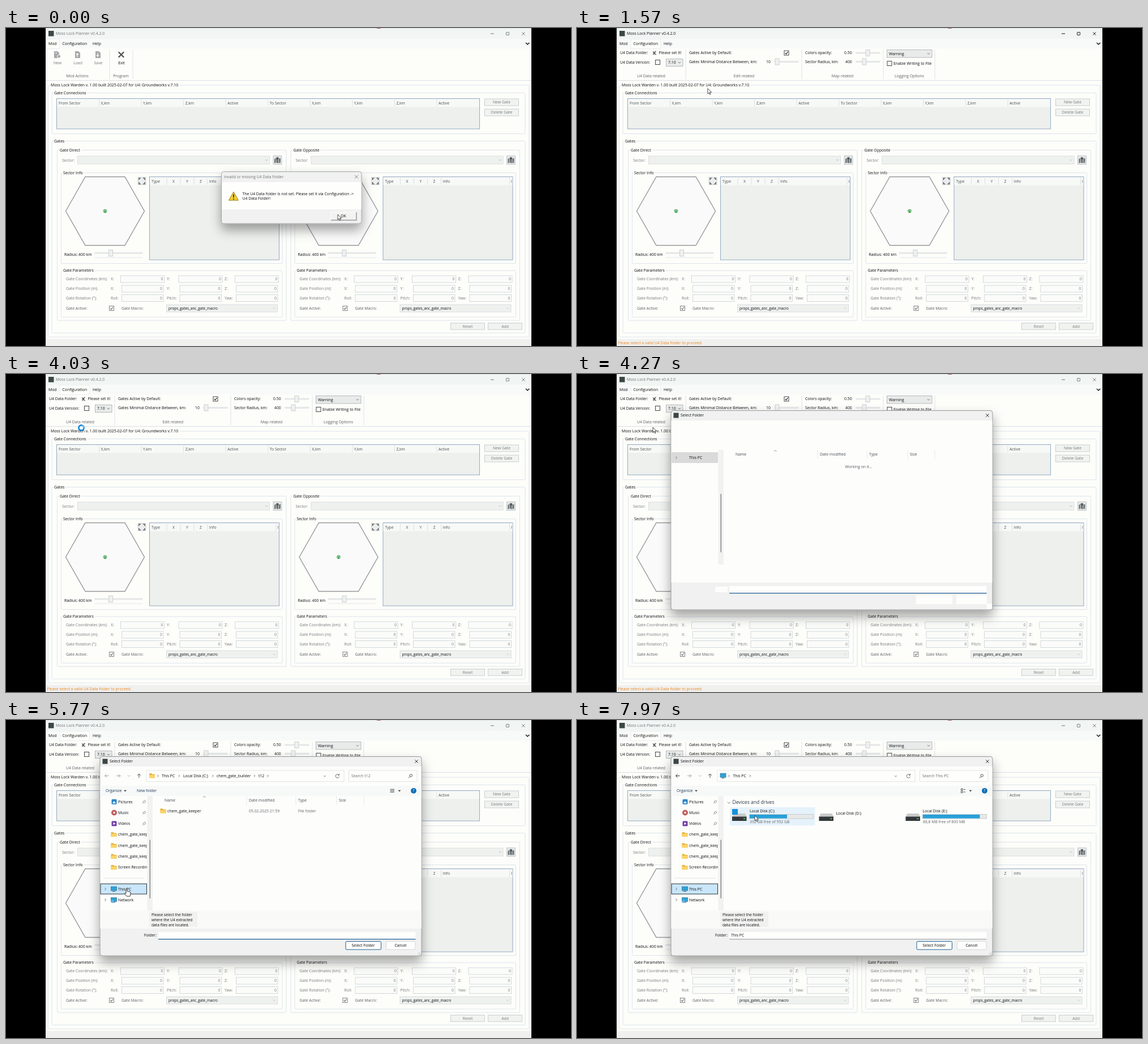
Write an HTML page that moves like this. It is 998 by 561 pixels and loops after 8 s.

```html
<!DOCTYPE html>
<html lang="en">
<head>
<meta charset="utf-8">
<title>Moss Lock Planner</title>
<style>
html, body { margin: 0; width: 100%; height: 100%; overflow: hidden; background: #000; }
svg { display: block; width: 100%; height: 100%; }
text { font-family: "Open Sans", "Noto Sans", sans-serif; white-space: pre; }
</style>
</head>
<body>
<svg id="stage" viewBox="0 0 998 561"></svg>
<script>
const INK = '#0c0e10', GREY = '#787b7b', LINE = '#dbe2ea', BG = '#fdfdfa', BLUE = '#1f5c93';
const LOOP = 8000;

// Drawing helpers
const rect = (x, y, w, h, fill, stroke = 'none', more = '') =>
  `<rect x="${x}" y="${y}" width="${w}" height="${h}" fill="${fill}" stroke="${stroke}" ${more}/>`;
const text = (x, y, s, fill = INK, size = 6.87, anchor = 'start', more = '') =>
  `<text x="${x}" y="${y + 2.4}" font-size="${size}" fill="${fill}" text-anchor="${anchor}" ${more}>${s}</text>`;
const mid = (x, y, s, fill) => text(x, y, s, fill, 6.87, 'middle');
const path = (d, stroke, w = 1, fill = 'none', more = '') =>
  `<path d="${d}" stroke="${stroke}" stroke-width="${w}" fill="${fill}" ${more}/>`;
const group = (id, body, more = '') => `<g id="${id}" ${more}>${body}</g>`;
const at = (x, y, body) => `<g transform="translate(${x} ${y})">${body}</g>`;
const each = (list, fn) => list.map(fn).join('');

const frame = (x, y, w, h, label, lx) =>
  rect(x, y, w, h, 'none', LINE, 'rx="1.5" stroke-width=".9"') +
  text(lx, y, label, INK, 6.87, 'start', `stroke="${BG}" stroke-width="4" paint-order="stroke"`);
const button = (x, y, w, h, s) =>
  rect(x, y, w, h, '#f1f3f1', '#c6cbcd', 'stroke-width=".9"') + mid(x + w / 2, y + h / 2, s, GREY);
const down = (x, y, c = '#555', r = 2) => path(`M${x - r} ${y - r / 2}l${r} ${r}l${r} ${-r}`, c, .8);
const cross = (x, y, r, c, w = .9) => path(`M${x - r} ${y - r}l${2 * r} ${2 * r}m0 ${-2 * r}l${-2 * r} ${2 * r}`, c, w);
const combo = (x, y, w, h, s, c, fill, edge = '#b0b4b6', size) =>
  rect(x, y, w, h, fill, edge, 'stroke-width=".9"') + text(x + 3.5, y + h / 2, s, INK, size) + down(x + w - 6, y + h / 2, c);
const check = (x, y, on, c = '#333') =>
  rect(x, y, 8, 8, '#fff', c, 'stroke-width=".9"') + (on ? path(`M${x + 1.8} ${y + 4}l1.7 2l3 -4.2`, c, 1.2) : '');
const slider = (x, y, w, thumb) =>
  rect(x, y - 1, w, 2, '#eceeee', '#d3d8db', 'stroke-width=".6"') +
  rect(thumb, y - 5.5, 7, 11, '#eff0f0', '#c4c8ca', 'stroke-width=".8"');
const list = (x, y, w, h, cols, seps) =>
  rect(x, y, w, h, '#edf0ed', '#94a9c2') + rect(x + .6, y + .6, w - 1.2, 14, '#f7f9f7') +
  each(cols, c => text(c[0], y + 8.5, c[1], '#4a4f51')) +
  each(seps, s => path(`M${s} ${y + 2}v12`, '#d4dade', .8));

const titleBar = c =>
  text(88, 10, 'Moss Lock Planner v0.4.2.0', c) +
  path('M856 10h6', c) + rect(883.5, 7.5, 5, 5, 'none', c, 'stroke-width=".9" rx=".6"') + cross(914, 10, 2.7, c);

function fileIcon(x, y, mark) {
  return path(`M${x - 4} ${y - 6}h6l3 3v9h-9z`, 'none', 0, '#a5a8a8') + path(mark, '#fff', 1.3);
}

const modRibbon = () =>
  path('M183 38v52M224 38v52', LINE, .9) +
  fileIcon(89, 47, 'M87 44h3') + `<circle cx="93.5" cy="50" r="3" fill="#a5a8a8" stroke="${BG}"/>` +
  fileIcon(126, 47, 'M126 51v-6m-2 2l2 -2l2 2') + fileIcon(162, 47, 'M162 44v6m-2 -2l2 2l2 -2') +
  cross(203.5, 47, 4.7, '#505252', 2.3) +
  each([['New', 91], ['Load', 127], ['Save', 163]], a => mid(a[1], 62, a[0], GREY)) + mid(204, 62, 'Exit') +
  mid(126, 85, 'Mod Actions', '#5e6162') + mid(203, 85, 'Program', '#5e6162');

const configRibbon = () =>
  path('M192 38v52M397 38v52M541 38v52M632 38v52', LINE, .9) +
  text(76, 44, 'U4 Data Folder:') + path('M134 41l2 2v3l-2 1M140 41l-3 1v4l3 1M134 44h5', '#3a3a3a', 1) + text(144.5, 44, 'Please set it!') +
  text(76, 61, 'U4 Data Version:') + check(138.5, 56.5, false) + combo(157.5, 54.5, 29.5, 13, '7.10', '#555', '#e9ebea') +
  text(198, 44, 'Gates Active by Default:') + check(366, 40, true) +
  text(198, 59.5, 'Gates Minimal Distance Between, km:') + text(334, 59.5, '10') + slider(349, 59.5, 42, 350) +
  text(403, 44, 'Colors opacity:') + text(472, 44, '0.50') + slider(493, 44, 42, 510) +
  text(403, 59.5, 'Sector Radius, km:') + text(474, 59.5, '400') + slider(493, 59.5, 42, 504) +
  combo(547.5, 38.5, 79.5, 13.5, 'Warning', '#555', '#e9ebea') + check(548, 58.5, false) + text(559, 62.5, 'Enable Writing to File') +
  each([[131, 'U4 Data related'], [295, 'Edit related'], [469, 'Map related'], [587, 'Logging Options']], c => mid(c[0], 85, c[1], '#5e6162'));

function gatePanel(dx, name) {
  const field = (x, y, w) => rect(x, y - 6, w, 12, '#fbfcfa', '#cfd4d9', 'stroke-width=".9"') + text(x + w - 2, y, '0', GREY, 6.87, 'end');
  const row = (y, label, names, wide) => text(106, y, label, GREY) +
    each([185, 284, 386], (x, i) => text(x, y, names[i], GREY)) +
    each([202.5, 305, 404.5], x => wide ? field(x, y, 77) : field(x + 2, y, 73.5));
  return at(dx, 0,
    frame(90.5, 215.5, 404.5, 300.5, name, 95) +
    text(99, 233.5, 'Sector:', GREY) + rect(126.5, 226, 339, 14, '#eff1ef', '#dadfe2') + down(460, 233, '#aaa') +
    rect(472, 225.5, 15, 15, '#e4e7e7', '#c3c8cb') +
    path('M474 231l3 -1.5l4 1.5l4 -1.5v8l-4 1l-4 -1l-3 1z', 'none', 0, '#70777a') + path('M477 230v8M481.5 231v8', '#e4e7e7', .8) +
    '<circle cx="479.5" cy="230" r="2.3" fill="#555b5e"/>' +
    frame(97.5, 255.5, 390.5, 160, 'Sector Info', 101) +
    path('M105.5 323L140 262.5H210L244.5 323L210 383.5H140Z', '#96989c', 1.4, '#fafafa') +
    '<circle cx="175" cy="323" r="3.3" fill="#45a455"/>' + path('M173 325v-2.5q2 -2.5 4 0v2.5', '#d8f0da', .9) +
    rect(233, 263.5, 14, 13, '#ebedee', '#c3c8cb', 'stroke-width=".8"') +
    path('M235 268v-3h3M242 265h3v3M245 272v3h-3M238 275h-3v-3', '#303234', 1.2) +
    list(253.5, 262.5, 229, 146.5, [[257, 'Type'], [294, 'X'], [318, 'Y'], [342, 'Z'], [359, 'Info'], [479.5, 'I']], [284, 308, 332, 356, 477]) +
    text(103, 400, 'Radius: 400 km') + slider(157, 397, 84, 181.5) + path('M157 405h84', '#dcdfe2', .8) +
    frame(97.5, 428, 390.5, 82, 'Gate Parameters', 101) +
    row(443, 'Gate Coordinates (km):', ['X:', 'Y:', 'Z:'], true) +
    row(460, 'Gate Position (m):', ['X:', 'Y:', 'Z:']) +
    row(476.5, 'Gate Rotation (°):', ['Roll:', 'Pitch:', 'Yaw:']) +
    text(106, 494.5, 'Gate Active:', '#5c5f60') + check(182.5, 490.5, true, '#777') + text(204, 494.5, 'Gate Macro:', '#5c5f60') +
    combo(283.5, 488, 196, 13, 'props_gates_anc_gate_macro', '#bbb', '#eff1ef', '#d5dadd', 6.4));
}

const mainWindow = () =>
  rect(70, 0, 858, 561, BG) + rect(70, 0, 858, 19, '#f1f5f4') +
  rect(70, 0, 858, .6, '#cfd4d6') + rect(655, 0, 7, 1, '#a55') + rect(75, 5, 9.5, 9.5, '#3c4745') +
  group('titleOn', titleBar('#101214')) + group('titleOff', titleBar('#707476')) +
  rect(70, 19, 858, 17, '#f8f9f9') +
  group('tabMod', rect(70.5, 20, 24, 16.5, BG, '#e3e7eb', 'stroke-width=".7"')) +
  group('tabConfig', rect(95, 20, 52.5, 16.5, BG, '#e3e7eb', 'stroke-width=".7"')) +
  text(75, 27.5, 'Mod') + text(99.5, 27.5, 'Configuration') + text(153, 27.5, 'Help') +
  path('M918 26l3.2 3l3.2 -3', '#111', 1.4) +
  path('M70 92.5H928', '#dce1e8') + group('modRibbon', modRibbon()) + group('configRibbon', configRibbon()) +
  frame(74.5, 101, 849.5, 444, 'Moss Lock Warden v. 1.00 built 2025-02-07 for U4: Groundworks v.7.10', 79) +
  frame(81, 114.5, 836, 72, 'Gate Connections', 85) +
  list(89.5, 124.5, 747, 53.5,
    ['From Sector', 'X,km', 'Y,km', 'Z,km', 'Active', 'To Sector', 'X,km', 'Y,km', 'Z,km', 'Active'].map((s, i) => [93 + 74.55 * i, s]),
    Array.from({ length: 9 }, (_, i) => 164.5 + 74.55 * i)) +
  button(845.5, 125, 60, 12, 'New Gate') + button(845.5, 143, 60, 12, 'Delete Gate') +
  frame(81, 199.5, 836, 338.5, 'Gates', 85) +
  gatePanel(0, 'Gate Direct') + gatePanel(412.5, 'Gate Opposite') +
  button(785.5, 520.5, 60, 11.5, 'Reset') + button(851.5, 520.5, 60, 11.5, 'Add') +
  rect(70, 548.5, 858, 12.5, '#f0f0ef') +
  group('status', text(72, 555.5, 'Please select a valid U4 Data folder to proceed.', '#e9851f'));

const warning = () =>
  rect(380.5, 253.5, 247.5, 91.5, '#f0f1f0', '#a0a4a7', 'rx="4" filter="url(#shade)"') +
  rect(381, 272, 246.5, 48, '#fefefd') +
  text(385, 263, 'Invalid or missing U4 Data Folder', '#707476') + cross(619, 262.5, 2.8, '#777') +
  path('M402 289l8.5 15h-17z', '#8f7f22', 1, '#f3cf2e', 'stroke-linejoin="round"') + path('M402 293.5v5.5M402 300.8v1.7', '#222', 1.7) +
  text(417.5, 292.5, 'The U4 Data folder is not set. Please set it via Configuration -&gt;') + text(417.5, 300.5, 'U4 Data Folder!') +
  rect(574, 325, 45, 14, '#f2f2f1') + path('M574 339V325H619', '#fff') + path('M574 339H619V325', '#6a6d6e') + mid(596, 332, 'OK');

// File picker
const crumbs = items => each(items, a => text(a[0], 98.5, a[1]) + path(`M${a[2]} 96.8l1.7 1.8l-1.7 1.8`, '#555', .9));
const folder = (x, y) => path(`M${x - 5} ${y - 4}h4l1.5 1.5h4.5v6.5h-10z`, 'none', 0, '#e6b13c') + rect(x - 5, y - 1.3, 10, 5.3, '#fbd468');
const screen = (x, y) => rect(x - 5, y - 4.2, 10, 7, '#2ea2d6', '#33718f', 'stroke-width=".7"') + path(`M${x - 2.5} ${y + 4.2}h5`, '#557', 1);
const drive = x => path(`M${x + 3} 165h20l3 6h-26z`, 'none', 0, '#c8caca') + rect(x, 170.5, 25.5, 7.5, '#34383a') + rect(x + 20, 173.5, 3, 1.3, '#6fe08a');
const usage = (x, used, s) => rect(x, 166.5, 113, 7.5, '#e7e8e8', '#bec2c4', 'stroke-width=".8"') +
  rect(x + .5, 167, used, 6.5, '#27a0d9') + text(x + .5, 179.5, s, '#636668');
const rowY = i => 144.2 + 19.25 * i;

function sidebar() {
  const icon = (y, c) => rect(186.5, y - 4.5, 9, 9, c, 'none', 'rx="1.5"');
  const pin = y => path(`M241.2 ${y + 3}l2 -2M241.7 ${y - .6}l3 3M242.6 ${y - .3}l2.2 -2.4l2.2 2.2l-2.4 2.2`, '#6d7072', .8);
  const names = ['Pictures', 'Music', 'Videos', 'chem_gate_keeper', 'chem_gate_keeper', 'chem_gate_keeper', 'Screen Recordings'];
  return each(names, (s, i) => text(198, rowY(i), s) + (i > 2 ? folder(190.5, rowY(i)) : pin(rowY(i)))) +
    icon(rowY(0), '#2b86c9') + path('M188 147l3 -4l3 4z', 'none', 0, '#fff') +
    `<circle cx="191" cy="${rowY(1)}" r="5" fill="#c0605f"/><circle cx="191" cy="${rowY(1)}" r="1.6" fill="#fff"/>` +
    icon(rowY(2), '#7440a8') + path('M189.5 180.5l4 2.2l-4 2.2z', 'none', 0, '#fff') +
    path('M172 279H244', '#dcdfe0', .9) + screen(190.5, rowY(8)) + screen(190.5, rowY(9)) +
    '<circle cx="188" cy="320" r="2.6" fill="#62b6dd"/>' +
    text(198, rowY(9), 'Network') + path('M174.5 315l2 2.2l-2 2.2', '#666', .9);
}

const columns = () =>
  each([[280, 'Name'], [429, 'Date modified'], [516, 'Type'], [588, 'Size']], c => text(c[0], 142, c[1], '#484d52')) +
  path('M425 134v16M512 134v16M584 134v16M632 134v16', '#e2e4e6', .8) + path('M348 136.5l2.3 -1.8l2.3 1.8', '#777', .8);

const chrome = () =>
  path('M181.5 98.5h-7m3 -3l-3 3l3 3M195 98.5h7m-3 -3l3 3l-3 3', '#9a9d9f', .9) + down(217, 98.5, '#999') +
  path('M235 102v-7m-3 3l3 -3l3 3', '#444', .9) +
  rect(248, 89, 349, 19.5, '#fefefd', '#e3e5e6') + rect(605.5, 89, 120.5, 19.5, '#fefefd', '#e3e5e6') + down(563, 99, '#666') +
  path('M588 97a3.2 3.2 0 1 0 .5 2.8M588.5 95v2.3h-2.3', '#555', .9) +
  `<circle cx="715.3" cy="98" r="2.2" fill="none" stroke="#444" stroke-width=".9"/>` + path('M713.6 99.7l-2.6 2.6', '#444', 1) +
  rect(166.5, 116, 567, 18, '#f7f8f8') +
  text(176, 125, 'Organize', '#1e3a56') + path('M208 123.7h5l-2.5 2.8z', 'none', 0, '#444') + path('M692.5 123.7h5l-2.5 2.8z', 'none', 0, '#444') +
  '<circle cx="720" cy="124.8" r="4.9" fill="#1070b8"/>' + text(720, 125, '?', '#fff', 6.5, 'middle') +
  rect(166.5, 336, 567, 32, '#f9faf8') + rect(253, 338.5, 85, 26.5, '#f1f1f0') +
  each(['Please select the folder', 'where the U4 extracted', 'data files are located.'], (s, i) => text(257, 343.3 + 9 * i, s, INK, 6.7)) +
  text(266, 380, 'Folder:', INK, 6.87, 'end') +
  rect(600, 390.5, 62.5, 14.5, '#fdfdfc', BLUE, 'rx="2"') + mid(631, 398, 'Select Folder') +
  rect(671.5, 390.5, 51.5, 14.5, '#fdfdfc', '#d5d7d8', 'rx="2"') + mid(697, 398, 'Cancel') +
  path('M727 414l5 -5M730 414l2 -2', '#b5b8ba', .9);

const picker = () =>
  rect(166, 64.5, 568, 351.5, '#f0f1f0', '#94989b', 'rx="4" filter="url(#shade)"') +
  rect(166.5, 82, 567, 286, '#fdfdfc') + rect(170.5, 68.5, 9, 9, '#3c4745') + text(183, 73, 'Select Folder') + cross(725, 73, 2.8, '#222') +
  rect(249.5, 134, 9.5, 202, '#f1f2f1') + path('M254.3 212V314', '#888c8e', 1.6, 'none', 'stroke-linecap="round"') +
  rect(269, 374, 454.5, 13, '#fefefd') + group('line', path('M269 386.6h454.5', 'currentColor', 1.2)) +
  group('loading',
    rect(167, 138, 82, 19, '#d9dad9') + text(198, 147.5, 'This PC') + path('M174.5 145.5l2 2.2l-2 2.2', '#666', .9) +
    mid(497.5, 163.3, 'Working on it...', '#565a5e') + columns() +
    rect(244, 375, 22, 10, '#fdfdfc') + rect(599, 390, 64, 16, '#fdfdfc') + rect(670, 390, 54, 16, '#fdfdfc') + rect(724, 405, 9, 10, '#fdfdfc')) +
  group('ready',
    rect(167, 0, 82, 18.8, '#e5f2fb', 'none', 'id="rowHover"') +
    rect(167, 289, 81.5, 18, '#d9dad9', 'none', 'id="pcRow"') +
    group('side', sidebar(), 'clip-path="url(#sideClip)"') + text(198, rowY(8), 'This PC') + path('M174.5 296l2 2.2l-2 2.2', '#666', .9) +
    chrome() +
    group('folderView', columns() + folder(258, 98.3) +
      crumbs([[275, 'This PC', 305], [313, 'Local Disk (C:)', 364.5], [372, 'chem_gate_builder', 438], [446, 't12', 461.5]]) +
      path('M267.5 96.8l1.7 1.8l-1.7 1.8', '#555', .9) + text(610, 99, 'Search t12', '#686c6e') + text(231, 125, 'New folder', '#1e3a56') +
      path('M678.5 122.3h7.5M678.5 124.8h7.5M678.5 127.2h7.5', '#444', 1) +
      folder(277.5, 160.3) + text(285, 160.7, 'chem_gate_keeper') + text(429, 160.7, '05.02.2025 21:59', '#636668') + text(516, 160.7, 'File folder', '#636668')) +
    group('pcView',
      path('M181.5 98.5h-7m3 -3l-3 3l3 3', '#333', .9) + screen(258, 98.3) + crumbs([[275.5, 'This PC', 305]]) +
      path('M267.5 96.8l1.7 1.8l-1.7 1.8', '#555', .9) + text(610, 99, 'Search This PC', '#686c6e') +
      each([122.5, 127], y => rect(678.5, y - 1.4, 2.8, 2.8, 'none', '#444', 'stroke-width=".8"') + path(`M683 ${y}h3`, '#444', .9)) +
      down(268.5, 146, '#555', 2.5) + text(274.5, 145.7, 'Devices and drives', '#2b3644', 8.55) +
      rect(270, 154, 150.5, 32, '#e5f2fb', 'none', 'id="driveHover"') +
      drive(274) + drive(427.5) + drive(580.5) + rect(274, 157, 10, 10, '#1890d8') +
      text(305, 161, 'Local Disk (C:)') + text(457.5, 165, 'Local Disk (D:)') + text(610.5, 161, 'Local Disk (E:)') +
      usage(304.5, 66, '392 GB free of 952 GB') + usage(610.5, 100.5, '88,8 MB free of 800 MB') +
      text(272, 380, 'This PC')) +
    group('caret', path('M272.3 375.5v8.5', '#111', .9)));

const pointers = () =>
  group('arrow', path('M0 0v9.2l2.2 -2l1.5 3.4l1.5 -.7l-1.5 -3.3h2.9z', '#222', .8, '#fff')) +
  group('hand', path('M-1 1q1 -1.5 2 0v4l5 1.2q1.5 .4 1.2 2.2l-1.2 5.6h-5.8l-3.6 -4.7q0 -1.7 1.7 -.8l.7 .6z', '#222', .9, '#fff')) +
  group('busy', '<circle r="4.6" cx="-1" cy="1" fill="#eaf6fd" stroke="#1583d2" stroke-width="2.6"/>' +
    '<g id="spin"><path d="M3.6 1A4.6 4.6 0 0 0 -1 -3.6" fill="none" stroke="#58b5ee" stroke-width="2.2"/></g>');

document.getElementById('stage').innerHTML =
  `<defs><filter id="shade" x="-20%" y="-40%" width="140%" height="200%">
    <feDropShadow dx="0" dy="11" stdDeviation="10" flood-color="#000" flood-opacity=".36"/></filter>
    <clipPath id="sideClip"><rect x="167" y="134" width="82" height="202"/></clipPath></defs>` +
  rect(0, 0, 998, 561, '#000') + mainWindow() + group('warning', warning()) + group('picker', picker()) + group('pointer', pointers());

const $ = id => document.getElementById(id);
const show = (id, on) => { $(id).style.display = on ? '' : 'none'; };

// Pointer stops: time, x, y
const STOPS = [
  [0, 586, 329], [795, 586, 329], [1895, 137, 48], [3430, 137, 48], [3720, 134, 94], [4290, 134, 94],
  [5100, 212, 201], [5260, 212, 201], [5700, 213, 297], [6000, 213, 297], [6750, 292, 296.5],
  [7640, 292, 296.5], [7960, 314, 168.5], [LOOP, 314, 168.5]
];
const OK = 500, CLICK = 3430, OPEN = 4200, READY = 4450, PICK = 5740, LOADED = 7100;

function pointerAt(t) {
  const i = Math.max(1, STOPS.findIndex(s => s[0] > t));
  const [t0, x0, y0] = STOPS[i - 1], [t1, x1, y1] = STOPS[i];
  const u = (t - t0) / (t1 - t0), e = u * u * (3 - 2 * u);
  return [x0 + (x1 - x0) * e, y0 + (y1 - y0) * e];
}

function render(t) {
  const [x, y] = pointerAt(t);
  const config = t >= OK, ready = t >= READY, picked = t >= PICK, pc = t >= LOADED;
  const active = config && t < CLICK, busy = t >= CLICK && t < OPEN;
  show('titleOn', active);
  show('titleOff', !active);
  for (const id of ['tabMod', 'modRibbon', 'warning']) show(id, !config);
  for (const id of ['tabConfig', 'configRibbon']) show(id, config);
  show('status', config && t < OK + 5000);

  show('picker', t >= OPEN);
  show('loading', !ready);
  show('ready', ready);
  show('folderView', !pc);
  show('pcView', pc);
  show('caret', !picked && (t - 4100) % 1060 < 530);
  $('line').style.color = pc ? '#a3a7a9' : BLUE;
  $('pcRow').setAttribute('fill', picked ? '#c9e6fa' : '#d9dad9');
  $('pcRow').setAttribute('stroke', picked ? '#2b3338' : 'none');

  const row = Math.floor((y - 134.6) / 19.25);
  const onRow = ready && x > 167 && x < 249 && row >= 0 && row < 10 && row !== 7;
  show('rowHover', onRow && row !== 8);
  $('rowHover').setAttribute('y', rowY(row) - 9.5);
  show('driveHover', x > 270 && x < 420 && y > 154 && y < 186);

  show('busy', busy);
  show('hand', onRow);
  show('arrow', !busy && !onRow);
  $('spin').setAttribute('transform', `rotate(${t * .36} -1 1)`);
  $('pointer').setAttribute('transform', `translate(${x} ${y})`);
}

const start = performance.now();
function tick() {
  render((performance.now() - start) % LOOP);
  requestAnimationFrame(tick);
}
tick();
</script>
</body>
</html>
```
